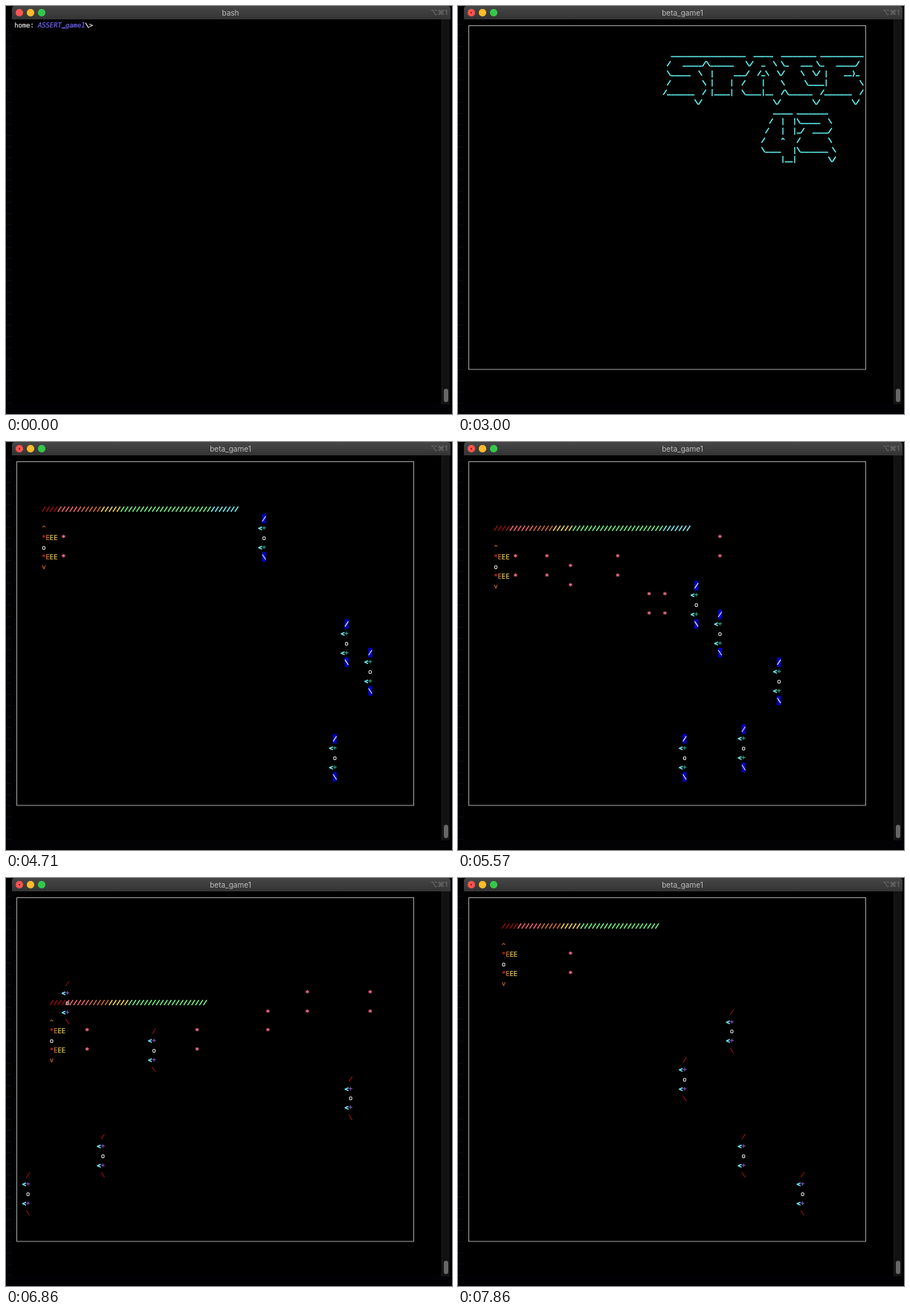
An HTML page with a canvas that plays this animation: 600 px wide and 549 px high, repeating every 8 s.

```html
<!DOCTYPE html>
<html lang="en">
<head>
<meta charset="utf-8">
<title>Terminal game</title>
<style>
  html, body { margin: 0; width: 100%; height: 100%; overflow: hidden; background: #000; }
  #desk { position: absolute; inset: 0; background:
    repeating-linear-gradient(#0000 0 14px, #0c0c12 14px 15px) 0 10px / 7px 100% no-repeat, #020204; }
  #window { position: absolute; left: 8px; top: 0; width: 590px; height: 536px; background: #000; }
  #bar { position: absolute; left: 0; top: 0; width: 590px; height: 18px; border-radius: 4px 4px 0 0;
    background: linear-gradient(#464647, #343435); font: 10px/18px Inter, sans-serif; color: #bdbdbd; }
  #title { position: absolute; left: 0; width: 588px; text-align: center; }
  #keys { position: absolute; right: 4px; color: #777; font: 9.5px/18px Inter, "DejaVu Sans", sans-serif; }
  .light { position: absolute; top: 4.3px; width: 9.4px; height: 9.4px; border-radius: 50%; }
  .busy::after { content: ""; position: absolute; inset: 3.4px; border-radius: 50%; background: #7c0d0a; }
  #track { position: absolute; left: 578px; top: 18px; width: 11px; height: 518px; background: #121212; border-left: 1px solid #1f1f1f; box-sizing: border-box; }
  #thumb { position: absolute; left: 2px; top: 497px; width: 6px; height: 18px; border-radius: 3px; background: #666; }
  canvas { position: absolute; left: 0; top: 0; width: 600px; height: 549px; }
</style>
</head>
<body>
<div id="desk"></div>
<div id="window">
  <div id="bar">
    <span id="title">bash</span><span id="keys">⌥⌘1</span>
    <i class="light" id="close" style="left:5.3px;background:#fc544e"></i>
    <i class="light" style="left:20.3px;background:#fdbb2d"></i>
    <i class="light" style="left:35.3px;background:#33c948"></i>
  </div>
  <div id="track"><div id="thumb"></div></div>
</div>
<canvas id="screen"></canvas>
<script>
const LOOP = 8000, TICKS = 56, CELL_W = 5.29, CELL_H = 12.87, LAST_COL = 101, LAST_ROW = 36;
const FONT = '8.8px "DejaVu Sans Mono", monospace';
const canvas = document.getElementById('screen'), ctx = canvas.getContext('2d');
const title = document.getElementById('title'), closeLight = document.getElementById('close');
const ratio = window.devicePixelRatio || 1;
canvas.width = 600 * ratio;
canvas.height = 549 * ratio;
ctx.scale(ratio, ratio);
ctx.textAlign = 'center';

const BANNER = String.raw`
  ___________________  _____  _________ ___________
 /   _____/\______   \/  _  \ \_   ___ \_   _____/
 \_____  \  |     ___/  /_\  \/    \  \/ |    __)_
 /        \ |    |  /    |    \     \____|        \
/_______  / |____|  \____|__  /\______  /_______  /
        \/                  \/        \/        \/
                            _____ ________
                           /  |  |\_____  \
                          /   |  |_/  ____/
                         /    ^   /       \
                         \____   |\_______ \
                              |__|        \/`.split('\n').slice(1);

const HEALTH = [[4, '#960d0d'], [6, '#f8686a'], [5, '#d4703a'], [5, '#fbdc58'], [23, '#78fa8a'], [7, '#7cf8fa']];

// Key points of the player's flight: [step, row].
const FLIGHT = [[0, 5], [7, 11], [9, 11], [13, 7], [19, 8], [22, 7], [34, 7], [44, 11], [70, 11], [78, 7], [88, 3]];

// Waves: [arrival step at the left edge, row, column where it starts to climb, step of destruction].
const ENEMIES = [
  [63, 8, 0, 20], [81, 31], [84, 19, 81, 30], [90, 22, 85], [96, 30, 50], [105, 23, 80],
  [123, 13, 0, 62], [150, 21, 68], [159, 15, 0, 87], [162, 16, 80], [165, 27], [180, 31],
];

// Launch steps of shots that cross the field, and of those that hit something on the way.
const SHOTS = [
  { reach: 94, launches: [0, 13, 22, 26, 34, 39, 48, 88] },
  { reach: 66, launches: [7, 9, 19, 62, 67] },
];

function shipRow(step) {
  const next = FLIGHT.findIndex(([at]) => at >= step);
  if (next < 0) return FLIGHT.at(-1)[1];
  if (next === 0) return FLIGHT[0][1];
  const [s0, r0] = FLIGHT[next - 1], [s1, r1] = FLIGHT[next];
  return Math.round(r0 + (r1 - r0) * (step - s0) / (s1 - s0));
}

function smooth(from, to, x) {
  const t = Math.min(1, Math.max(0, (x - from) / (to - from)));
  return t * t * (3 - 2 * t);
}

function slash(x, y, lean, width) {
  ctx.lineWidth = width;
  ctx.beginPath();
  ctx.moveTo(x - 2.3 * lean, y + 3.6);
  ctx.lineTo(x + 2.3 * lean, y - 3.4);
  ctx.stroke();
}

function put(text, col, row, color, { bold = false, italic = false, back } = {}) {
  ctx.font = (italic ? 'italic ' : '') + (bold ? 'bold ' : '') + FONT;
  [...text].forEach((char, i) => {
    const x = 13.9 + (col + i) * CELL_W, y = 26 + row * CELL_H;
    if (back) {
      ctx.fillStyle = back;
      ctx.fillRect(x - CELL_W / 2, y - CELL_H / 2, CELL_W, CELL_H);
    }
    ctx.fillStyle = ctx.strokeStyle = color;
    if (char === '_') ctx.fillRect(x - CELL_W / 2, y + 2.8, CELL_W + .1, 1.4);
    else if (char === '/') slash(x, y, 1, bold ? 1.5 : 1.1);
    else if (char === '\\') slash(x, y, -1, bold ? 1.5 : 1.1);
    else {
      ctx.lineWidth = bold ? .4 : .2;
      ctx.fillText(char, x, y + 3.2);
      ctx.strokeText(char, x, y + 3.2);
    }
  });
}

function drawPrompt(command) {
  put('home:', 0, 0, '#e6e6e6');
  put('ASSERT_game1', 6, 0, '#7468ff', { italic: true });
  put('\\>' + command, 18, 0, '#e6e6e6');
}

function drawBorder() {
  ctx.strokeStyle = '#a4a4a4';
  ctx.lineWidth = 1;
  ctx.strokeRect(14.5, 26.5, Math.floor(LAST_COL * CELL_W), Math.floor(LAST_ROW * CELL_H) - .5);
}

function drawShip(step) {
  const hit = step >= 36, row = shipRow(step), col = hit ? 9 : 7;
  let left = hit ? 40 : 50, at = col;
  for (const [length, color] of HEALTH) {
    const n = Math.min(length, left);
    put('/'.repeat(n), at, row, color, { bold: true });
    at += n;
    left -= n;
  }
  put('^', col, row + 2, '#d9702c');
  put('o', col, row + 4, '#f0f0f0');
  put('v', col, row + 6, '#d9702c');
  for (const r of [row + 3, row + 5]) {
    put('*', col, r, '#d02a20');
    put('E', col + 1, r, '#dd7c34');
    put('EE', col + 2, r, '#efd052');
  }
}

function drawEnemy(col, row, red) {
  const wing = red ? ['#960c14'] : ['#f0f0f0', { back: '#0000c8' }];
  put('/', col, row - 2, ...wing);
  put('\\', col, row + 2, ...wing);
  for (const r of [row - 1, row + 1]) {
    put('<', col - 1, r, '#7cfafe', { bold: true });
    put('+', col, r, red ? '#9a5ce8' : '#30c0a4');
  }
  put('o', col, row, '#f0f0f0');
}

function drawEnemies(step) {
  for (const [arrival, startRow, turn = 0, last = Infinity] of ENEMIES) {
    const x = arrival - step;
    // They rush through the middle; later waves appear nearer.
    const col = Math.round(x - 13.2 * smooth(55, 17, x));
    const row = Math.round(startRow - .18 * Math.max(0, turn - x));
    const entry = 103.1 - arrival / 10;
    if (col > 0 && x < entry && step <= last) drawEnemy(col, row, step >= 63);
  }
}

function drawShots(step) {
  for (const { reach, launches } of SHOTS) for (const launch of launches) {
    const col = 12 + 2 * (step - launch);
    if (col < 12 || col > reach) continue;
    for (const gun of [3, 5]) put('*', col, shipRow(launch) + gun, '#f6708a', { bold: true });
  }
}

function draw(time) {
  const tick = Math.min(TICKS - 1, Math.floor((time + 5) * 7 / 1000));
  const running = tick >= 3;
  title.textContent = running ? 'beta_game1' : 'bash';
  closeLight.classList.toggle('busy', running);
  ctx.clearRect(0, 0, 600, 549);
  if (tick < 4) return drawPrompt(running ? ' ./beta_game1' : '');
  drawBorder();
  if (tick < 27) {
    BANNER.forEach((line, i) => put(line, 50, 3 + i, '#66fafa', { bold: true }));
    return;
  }
  const step = Math.round((tick - 33) * 4.33);
  drawShots(step);
  drawEnemies(step);
  drawShip(step);
}

let start;
function frame(now) {
  start ??= now;
  draw((now - start) % LOOP);
  requestAnimationFrame(frame);
}
draw(0);
requestAnimationFrame(frame);
</script>
</body>
</html>
```
